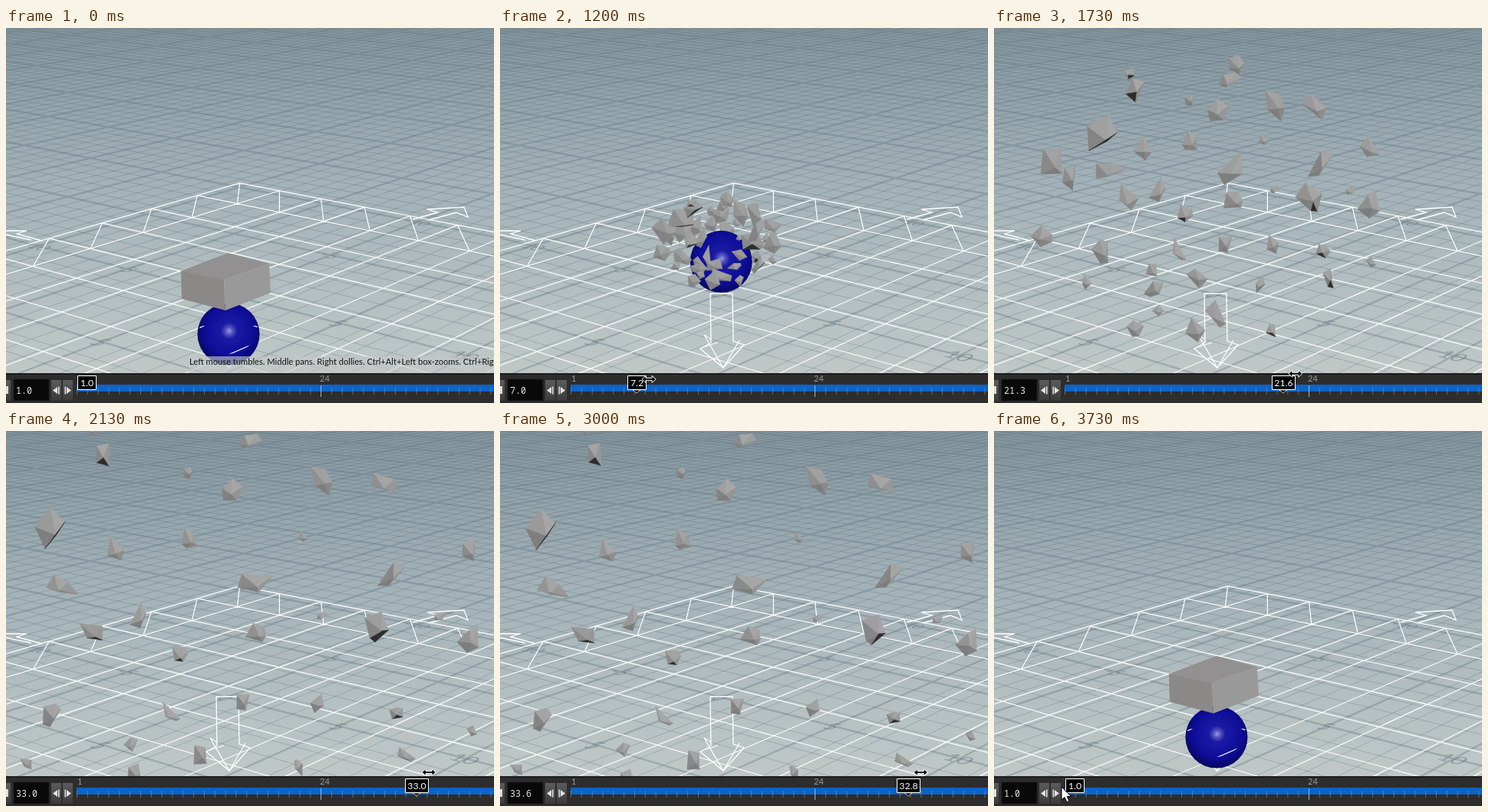
An HTML page that plays this animation: 636x490 px, repeating every 4.27 s.

```html
<!DOCTYPE html>
<html lang="en">
<head>
<meta charset="utf-8">
<title>Scrubbing a fracture simulation</title>
<style>
html, body { margin: 0; width: 100%; height: 100%; overflow: hidden; background: #2b2b2b; }
svg { display: block; width: 636px; height: 490px; }
.ui { font-family: Lato, sans-serif; }
.mono { font-family: "Noto Sans Mono", monospace; }
</style>
</head>
<body>
<svg id="stage" viewBox="0 0 636 490">
  <defs>
    <linearGradient id="sky" x2="0" y2="1">
      <stop offset="0" stop-color="#8697a0"/>
      <stop offset=".45" stop-color="#a3b2b8"/>
      <stop offset="1" stop-color="#c0c8c7"/>
    </linearGradient>
    <radialGradient id="ball" cx=".51" cy=".45" r=".6">
      <stop offset="0" stop-color="#9a9ae0"/>
      <stop offset=".1" stop-color="#5252c0"/>
      <stop offset=".22" stop-color="#1a1aa4"/>
      <stop offset=".65" stop-color="#0d0d98"/>
      <stop offset="1" stop-color="#06064e"/>
    </radialGradient>
    <linearGradient id="key" x2="0" y2="1">
      <stop offset="0" stop-color="#5c5c5c"/>
      <stop offset="1" stop-color="#3a3a3a"/>
    </linearGradient>
    <clipPath id="low"><path id="lowPath"/></clipPath>
  </defs>
  <rect width="636" height="452" fill="url(#sky)"/>
  <g id="floor" fill="none"></g>
  <g id="wire" fill="none" stroke="#fff" stroke-width="1.2"></g>
  <g fill="none" stroke="#fff" stroke-width="1.3">
    <path d="M530 250L563 241 549 237 597 234 602 247 587 241 551 251"/>
    <path d="M0 265H27L14 269 47 278M0 270L33 277"/>
    <path d="M274 347H302M274 347L275 411 261 419 291 444 318 414 304 409 303 346"/>
    <path d="M266 401L291 444 312 408M266 401L275 407M262 418L284 411"/>
  </g>
  <g id="back"></g>
  <circle id="sphere" r="40.5" fill="url(#ball)"/>
  <use id="sunk" href="#wire" clip-path="url(#low)"/>
  <g id="cube">
    <path fill="#929090" d="M228 317L290 294 343 308 284 329Z"/>
    <path fill="#8b8888" d="M228 317L284 329 286 369 229 354Z"/>
    <path fill="#9a9999" d="M284 329L343 308 345 346 286 369Z"/>
  </g>
  <g id="front"></g>
  <g id="hint">
    <rect x="238" y="429" width="398" height="22" fill="#c2c9c9" opacity=".64"/>
    <text class="ui" x="239" y="440" font-size="11.15" fill="#151515">Left mouse tumbles. Middle pans. Right dollies. Ctrl+Alt+Left box-zooms. Ctrl+Right</text>
  </g>
  <rect y="451" width="636" height="39" fill="#2d2d2d"/>
  <rect y="451" width="636" height="2" fill="#1c1c1c"/>
  <rect x="92" y="466" width="544" height="9" fill="#0d63c6"/>
  <path id="ticks" fill="none" stroke="#8295a8" opacity=".6"/>
  <path d="M410.5 467V482" stroke="#a9b4be"/>
  <text class="ui" x="93" y="462" font-size="11" fill="#999">1</text>
  <text class="ui" x="409" y="462" font-size="11" fill="#999">24</text>
  <rect x="-8" y="460" width="14" height="27" fill="url(#key)"/>
  <rect y="468" width="3" height="10" fill="#ddd"/>
  <rect x="10" y="459" width="46" height="28" fill="#090909" stroke="#1a1a1a"/>
  <rect x="59" y="460" width="13" height="27" fill="url(#key)"/>
  <rect x="74" y="460" width="13" height="27" fill="url(#key)"/>
  <path fill="#e2e2e2" d="M67 469V478L61 473.5ZM68 468.5h1.6v10H68ZM79 469V478L85 473.5ZM76.5 468.5h1.6v10h-1.6Z"/>
  <text class="mono" id="readout" x="13" y="478" font-size="11.7" fill="#e4e4e4"></text>
  <path id="flagBox" fill="#000" stroke="#fff"/>
  <path id="flagTip" d="M-5 473H5L0 477Z" fill="#000" stroke="#fff" stroke-width=".7"/>
  <text class="ui" id="flagText" y="467.5" font-size="12.3" fill="#fff" text-anchor="middle"></text>
  <path id="arrow" d="M0 0V17L4 13.5 7 20 10 18.5 7.2 12.5H12.5Z" fill="#fff" stroke="#000"/>
  <path id="resize" d="M-9 0L-4 -4.5V-1.5H4V-4.5L9 0 4 4.5V1.5H-4V4.5Z" fill="#000" stroke="#fff"/>
</svg>
<script>
const $ = id => document.getElementById(id);
const set = (e, attrs) => {
  for (const k in attrs) e.setAttribute(k, attrs[k]);
  return e;
};
const add = (tag, parent, attrs = {}) =>
  set(parent.appendChild(document.createElementNS("http://www.w3.org/2000/svg", tag)), attrs);
const show = (e, on) => set(e, { visibility: on ? "visible" : "hidden" });
const mix = (a, b, k) => a + (b - a) * k;

// Ground plane perspective: (u, v) in world units to stage pixels
function ground(u, v) {
  const p = -0.0118 * u, q = -0.01877 * v, w = 1 + p + q;
  return [(288 - 2039 * p + 1862 * q) / w, (348 - 250 * (p + q)) / w];
}
const seg = (u1, v1, u2, v2) => {
  const [a, b] = [ground(u1, v1), ground(u2, v2)].map(p => p.map(n => n.toFixed(1)).join(" "));
  return `M${a}L${b}`;
};
const cross = (k, from, to) => seg(from, k, to, k) + seg(k, from, k, to);

function drawFloor() {
  const floor = $("floor");
  let minor = "", major = "";
  for (let i = -70; i <= 14; i++) {
    if (i % 5) minor += cross(i, -70, 14);
    else major += cross(i, -70, 14);
  }
  add("path", floor, { d: minor, stroke: "#5f727d", "stroke-opacity": .38, "stroke-width": .9 });
  add("path", floor, { d: major, stroke: "#5f727d", "stroke-opacity": .36, "stroke-width": 2.4 });

  const mark = (u, v) => {
    const o = ground(u, v), x = ground(u + 1, v), y = ground(u, v + 1);
    const m = [x[0] - o[0], x[1] - o[1], y[0] - o[0], y[1] - o[1]].map(n => n / 16);
    add("text", floor, {
      class: "ui", "font-size": 12, y: 5, "text-anchor": "middle", fill: "#5d6d76", "fill-opacity": .5,
      transform: `matrix(${m} ${o})`
    }).textContent = u + v;
  };
  mark(0, 0);
  for (const k of [-10, -5, 5, 10]) {
    mark(k, 0);
    mark(0, k);
  }
}

// White plane grid, its border cells split by diagonals
function drawWire() {
  const edge = -10.5, step = 2.42, far = 13;
  let d = "";
  for (let k = edge; k < far; k += step) {
    d += cross(k, edge, far);
    d += seg(k, edge, k + step, edge + step) + seg(edge, k, edge + step, k + step);
  }
  add("path", $("wire"), { d });
}

function drawTicks() {
  let d = "";
  for (let i = 0; i < 40; i++) d += `M${(92.5 + i * 13.83).toFixed(1)} 470V479`;
  set($("ticks"), { d });
}

let seed = 41;
const rnd = () => (seed = (seed * 16807) % 2147483647) / 2147483647;

// Shards spread over a disc in golden-angle order, the innermost behind the ball
const COUNT = 44;
const shards = Array.from({ length: COUNT }, (_, i) => {
  const a = i * 2.4 + rnd() * .5, far = Math.sqrt((i + .6) / COUNT);
  const r = mix(7, 24, rnd()), sides = 4 + Math.floor(rnd() * 2), squash = mix(.5, 1, rnd());
  const pts = Array.from({ length: sides }, (_, k) => {
    const t = (k + rnd() * .7) / sides * Math.PI * 2, q = r * mix(.75, 1.25, rnd());
    return [Math.cos(t) * q, Math.sin(t) * q * squash];
  });
  return {
    dx: 235 * far * Math.cos(a), dy: 212 * far * Math.sin(a),
    r, pts, turn: rnd() * 6.28, spin: (rnd() - .5) * .14, dark: i % 4 === 1,
    faces: pts.map(() => add("polygon", i < 4 ? $("back") : $("front"), { "stroke-width": .6 }))
  };
});

function drawShard(s, f) {
  const spread = Math.hypot(.17, .0475 * (f - 1));
  const x = 286 + s.dx * spread;
  const y = 226 + .27 * (f - 21) ** 2 + s.dy * (spread - .05);
  const size = Math.min(1, .7 + f / 60), contrast = Math.min(1, .3 + f / 14);
  const a = s.turn + s.spin * f, c = Math.cos(a) * size, w = Math.sin(a) * size;
  const rim = s.pts.map(p => [x + p[0] * c - p[1] * w, y + p[0] * w + p[1] * c]);
  const core = [x + w * s.r * .25, y + s.r * size * .3];
  s.faces.forEach((face, i) => {
    const p = rim[i], q = rim[(i + 1) % rim.length];
    const m = Math.atan2((p[1] + q[1]) / 2 - y, (p[0] + q[0]) / 2 - x), down = Math.sin(m);
    const lit = Math.round(145 + contrast * (9 * Math.cos(m) - 19 * down));
    const l = s.dark && f > 5 && down > .9 ? 45 : lit;
    const fill = `rgb(${l},${l},${l})`;
    set(face, { points: [p, q, core].map(v => v.map(n => n.toFixed(1))).join(" "), fill, stroke: fill });
  });
}

// Scrubbed time: [step of 1/15 s, simulation time]
const keys = [[9, 1], [14, 2], [18, 7], [22, 13], [26, 21.3], [32, 33], [40, 35], [43, 35], [45, 33.6], [50, 8], [54, 1.8], [56, 1]];
function simAt(n) {
  const i = keys.findIndex(k => k[0] > n);
  if (i < 1) return 1;
  const [a, b] = [keys[i - 1], keys[i]];
  return mix(a[1], b[1], (n - a[0]) / (b[0] - a[0]));
}

function drawBall(f) {
  const x = mix(290, 286.5, Math.min(1, (f - 1) / 12));
  const late = Math.max(0, f - 13);
  const y = 400 - 26 * Math.min(1, f - 1) - 13.73 * Math.max(0, f - 2) - 2.2 * late * late;
  set($("sphere"), { cx: x, cy: y });
  set($("lowPath"), { d: `M${x - 38} ${y - 12}a38 38 0 0 0 76 0q-38 12 -76 0Z` });
}

function drawFlag(x, label) {
  const w = label.length > 3 ? 30 : 24, cx = Math.round(Math.max(104.5, x));
  set($("flagBox"), { d: `M${cx - w / 2 + .5} 454.5h${w}v18h${-w}Z` });
  show(set($("flagTip"), { transform: `translate(${x.toFixed(1)} 0)` }), x > 99);
  set($("flagText"), { x: cx + .5 }).textContent = label;
}

function drawMouse(n, x, g) {
  const entering = n < 10, leaving = n >= 55;
  const k = 1 - (1 - Math.min(1, Math.max(0, (n - 4) / 5))) ** 2;
  let at = [x + 16, 462 - .5 * (g - 1)];
  if (entering) at = [mix(300, 118, k), mix(310, 464, k)];
  if (leaving) at = [88, 465];
  const transform = `translate(${at})`;
  show(set($("arrow"), { transform }), (entering && n >= 4) || leaving);
  show(set($("resize"), { transform }), !entering && !leaving);
}

function draw(n) {
  const f = simAt(n), g = simAt(n + .15), x = 92 + (g - 1) * 13.83;
  const burst = f > 1.25;
  drawBall(f);
  show($("sunk"), f < 3);
  show($("cube"), f < 3);
  show($("front"), burst);
  show($("back"), burst);
  if (burst) for (const s of shards) drawShard(s, f);
  show($("hint"), n < 5);
  $("readout").textContent = f.toFixed(1);
  drawFlag(x, g.toFixed(1));
  drawMouse(n, x, g);
}

drawFloor();
drawWire();
drawTicks();
const LOOP = 4270, STEP = 1000 / 15, start = performance.now();
let last = -1;
function tick() {
  const t = Math.max(0, performance.now() - start) % LOOP;
  const n = Math.floor(t / STEP + .08);
  if (n !== last) draw(last = n);
  requestAnimationFrame(tick);
}
tick();
</script>
</body>
</html>
```
